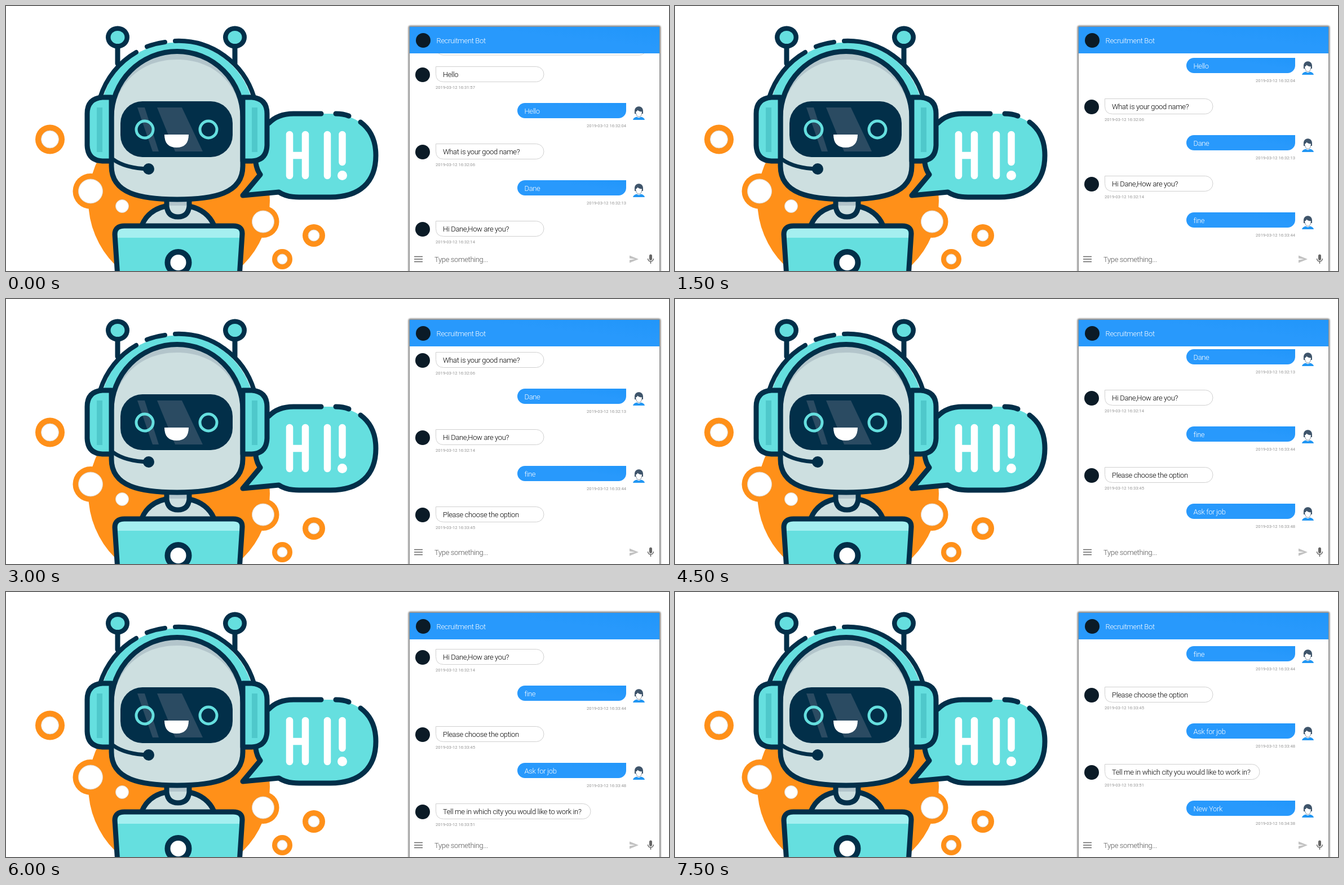
Write an HTML page that moves like this. It is 1176x470 px and loops after 8000 ms.

```html
<!DOCTYPE html>
<html lang="en">
<head>
<meta charset="utf-8">
<title>Recruitment Bot</title>
<style>
  html, body { margin: 0; width: 100%; height: 100%; overflow: hidden; background: #fff; }
  svg { display: block; width: 1176px; height: 470px; font: 300 13px Roboto, sans-serif; letter-spacing: -.35px; }
  .line { fill: none; stroke: #022f49; stroke-width: 9; stroke-linecap: round; stroke-linejoin: round; }
  .navy { fill: #022f49; }
  .teal { fill: #65dfdf; }
  .grey { fill: #cddfe0; }
  .shade { fill: #b3c5cb; }
  .orange { fill: #ff9019; }
  .white { fill: #fff; }
  .time { font-size: 7.65px; font-weight: 400; letter-spacing: 0; fill: #949494; }
</style>
</head>
<body>
<svg viewBox="0 0 1176 470">
  <defs>
    <linearGradient id="blue" x1="0" y1="1" x2="1" y2="0">
      <stop offset=".6" stop-color="#2899fc"/><stop offset="1" stop-color="#2196fa"/>
    </linearGradient>
    <clipPath id="view"><path d="M716 84H1159V430H716Z"/></clipPath>
    <path id="head" d="M187 197A116.500 116.500 0 0 1 420 197V284C420 333 368 343 303.500 343S187 333 187 284Z"/>
    <clipPath id="skull"><use href="#head"/></clipPath>
    <filter id="soft" x="-5%" y="-5%" width="110%" height="110%"><feGaussianBlur stdDeviation="1.300"/></filter>
    <g id="side">
      <path class="line" d="M198 72V102"/>
      <ellipse class="navy" cx="198" cy="55.500" rx="21" ry="20"/>
      <ellipse class="teal" cx="198" cy="55.500" rx="12.500" ry="11.500"/>
    </g>
    <g id="ear">
      <path class="teal" d="M187 162H171Q144 164 144 191V247Q145 274 171 275H187Z"/>
      <path fill="#4fc8cb" d="M161 180H171V259H161Z"/>
      <path class="line" d="M187 162H171Q144 164 144 191V247Q145 274 171 275H187Z"/>
    </g>
    <g id="user">
      <path d="M1117 189Q1118 196 1122.500 196.500T1128 189" fill="none" stroke="#7d8b9a"/>
      <path fill="#3f556b" d="M1115 191V186C1115 175.500 1130 175.500 1130 186V191H1128V187.500Q1122 187 1120.500 184.500Q1119 187.500 1117 187.500V191Z"/>
      <path fill="#2196f3" d="M1112 202Q1113 197.500 1119 196.500Q1122.500 200 1126 196.500Q1132 197.500 1133 202Z"/>
    </g>
  </defs>
  <rect width="1176" height="470" fill="#fff"/>

  <!-- backdrop -->
  <g class="orange">
    <circle cx="307" cy="345" r="161"/>
    <circle cx="78" cy="236.500" r="26"/><circle cx="150" cy="328.500" r="31.500"/>
    <circle cx="456" cy="382.500" r="28.500"/><circle cx="546" cy="407" r="20"/>
    <circle cx="490" cy="449" r="18"/>
  </g>
  <g class="white" stroke="#ddd3c9">
    <circle cx="78" cy="236.500" r="15.500"/><circle cx="150" cy="328.500" r="21.500"/>
    <circle cx="206" cy="355" r="11.500"/><circle cx="456" cy="382.500" r="19.500"/>
    <circle cx="546" cy="407" r="10"/><circle cx="490" cy="449" r="9"/>
  </g>

  <!-- speech bubble -->
  <path class="teal" d="M450 230Q466 191 510 191H570C625 190 656 220 656 265C656 312 628 339 575 339H520Q497 339 484 330L420 336L451 299Q445 291 443 278Z"/>
  <path class="line" d="M466 208Q482 191 510 191H559M585 191Q598 191 608 195M629 206C648 220 656 240 656 265C656 312 628 339 575 339H520Q497 339 484 330L420 336L451 299Q445 291 443 278"/>
  <g fill="none" stroke="#fff" stroke-width="12.500" stroke-linecap="round">
    <path d="M503 228V301M531 228V301M503 265H531M570 228V301M596.500 228V277"/>
  </g>
  <circle class="white" cx="596.500" cy="300.500" r="8.500"/>

  <!-- body and laptop -->
  <path class="grey" d="M240 391Q250 360 284 354H324Q360 360 370 391Z"/>
  <path class="line" d="M241 389Q252 362 283 355M325 355Q357 362 369 389"/>
  <path class="grey" d="M285 342H325V355Q323 375 305 375Q287 375 285 355Z"/>
  <path class="shade" d="M288 346H322V354H288Z"/>
  <path class="line" d="M285 345V355Q287 374 305 374Q323 374 325 355V345"/>
  <path class="teal" d="M198 480L193 405Q193 390 210 390H403Q420 390 419 405L414 480Z"/>
  <path fill="#a5eff0" d="M198 411V404Q199 394 210 394H403Q414 394 414 404V411Z"/>
  <path class="line" d="M198 480L193 405Q193 390 210 390H403Q420 390 419 405L414 480"/>
  <circle cx="305.500" cy="455" r="19" class="white" stroke="#022f49" stroke-width="10"/>

  <!-- head -->
  <use href="#side"/>
  <use href="#side" transform="matrix(-1 0 0 1 604 0)"/>
  <path class="teal" d="M166 202A137.500 137.500 0 0 1 441 202Z"/>
  <path class="line" style="stroke-width:8" d="M167 162A140 140 0 0 1 231 82M250 72A140 140 0 0 1 282 64M300 62A140 140 0 0 1 440 162"/>
  <g clip-path="url(#skull)">
    <path class="shade" d="M180 75H430V350H180Z"/>
    <path class="grey" d="M187 214C190 136 240 95 303.500 95S417 136 420 214V350H187Z"/>
  </g>
  <use href="#head" class="line"/>
  <use href="#ear"/>
  <use href="#ear" transform="matrix(-1 0 0 1 607 0)"/>
  <rect class="navy" x="203" y="169" width="199" height="99" rx="39"/>
  <path fill="#2b4b62" d="M233 180H246L271 258H260ZM268 180H312L349 258H300Z"/>
  <g fill="none" stroke="#65dfdf" stroke-width="5">
    <circle cx="246" cy="219" r="15"/><circle cx="359" cy="219" r="15"/>
  </g>
  <path class="white" d="M281 228H324Q324 251 302.500 251Q281 251 281 228Z"/>
  <path class="line" style="stroke-width:7" d="M190 272Q212 288 253 289"/>
  <circle class="navy" cx="253" cy="289" r="10"/>

  <!-- chat window -->
  <rect x="713.500" y="34.500" width="448" height="450" rx="4" fill="#8d8d8d" filter="url(#soft)"/>
  <path class="white" d="M716 37H1159V470H716Z"/>
  <g clip-path="url(#view)"><g id="list">
    <rect x="762.500" y="59.500" width="374" height="27.500" rx="13" fill="#fff" stroke="#d0d0d0"/>
  </g></g>
  <path fill="url(#blue)" d="M716 37H1159V84H716Z"/>
  <circle cx="740" cy="61" r="13" fill="#0b1b27"/>
  <text x="763.500" y="66" class="white">Recruitment Bot</text>
  <path d="M724 444.500H739M724 449H739M724 453.500H739" stroke="#666" stroke-width="1.500"/>
  <text x="760" y="453.500" fill="#555">Type something...</text>
  <path fill="#c2c2c2" d="M1106 442.500L1122 449L1106 455.500V450.500L1116 449L1106 447.500Z"/>
  <rect x="1141" y="440.500" width="5" height="10.500" rx="2.500" fill="#666"/>
  <path d="M1138.500 448Q1139 453 1143.500 453T1148.500 448M1143.500 453V457" fill="none" stroke="#666" stroke-width="1.500"/>
</svg>
<script>
const list = document.getElementById('list');
// Bot and user take turns.
const talk = [
  ['Hello', '31:57'], ['Hello', '32:04'],
  ['What is your good name?', '32:06'], ['Dane', '32:13'],
  ['Hi Dane,How are you?', '32:14'], ['fine', '33:44'],
  ['Please choose the option', '33:45'], ['Ask for job', '33:48'],
  ['Tell me in which city you would like to work in?', '33:51', 275], ['New York', '34:38']
];
const scroll = [0, 80, 150, 220, 280, 350];

function bot(y, text, time, w = 192) {
  return `<circle cx="739" cy="${y + 15}" r="13" fill="#0b1b27"/>
    <path d="M762.500 ${y + .5}h${w - 14}a13.500 13.500 0 0 1 0 27h${28 - w}q-14 0-14-14z" fill="#fff" stroke="#d0d0d0"/>
    <text x="775" y="${y + 19}">${text}</text>
    <text class="time" x="762" y="${y + 40}">${time}</text>`;
}

function user(y, text, time) {
  return `<path d="M920.500 ${y}H1100v13.500a13.500 13.500 0 0 1-13.500 13.500H920.500a13.500 13.500 0 0 1 0-27z" fill="url(#blue)"/>
    <text class="white" x="919.500" y="${y + 18.5}">${text}</text>
    <text class="time" x="1100" y="${y + 42.5}" text-anchor="end">${time}</text>
    <use href="#user" y="${y - 172}"/>`;
}

list.innerHTML += talk.map(([text, time, w], i) => {
  const y = 107 + (i >> 1) * 137 + (i % 2) * 65;
  return (i % 2 ? user : bot)(y, text, '2019-03-12 16:' + time, w);
}).join('');

function draw() {
  const step = Math.floor(performance.now() % 8000 / 1500);
  list.setAttribute('transform', `translate(0 ${-scroll[step]})`);
  requestAnimationFrame(draw);
}
draw();
</script>
</body>
</html>
```
